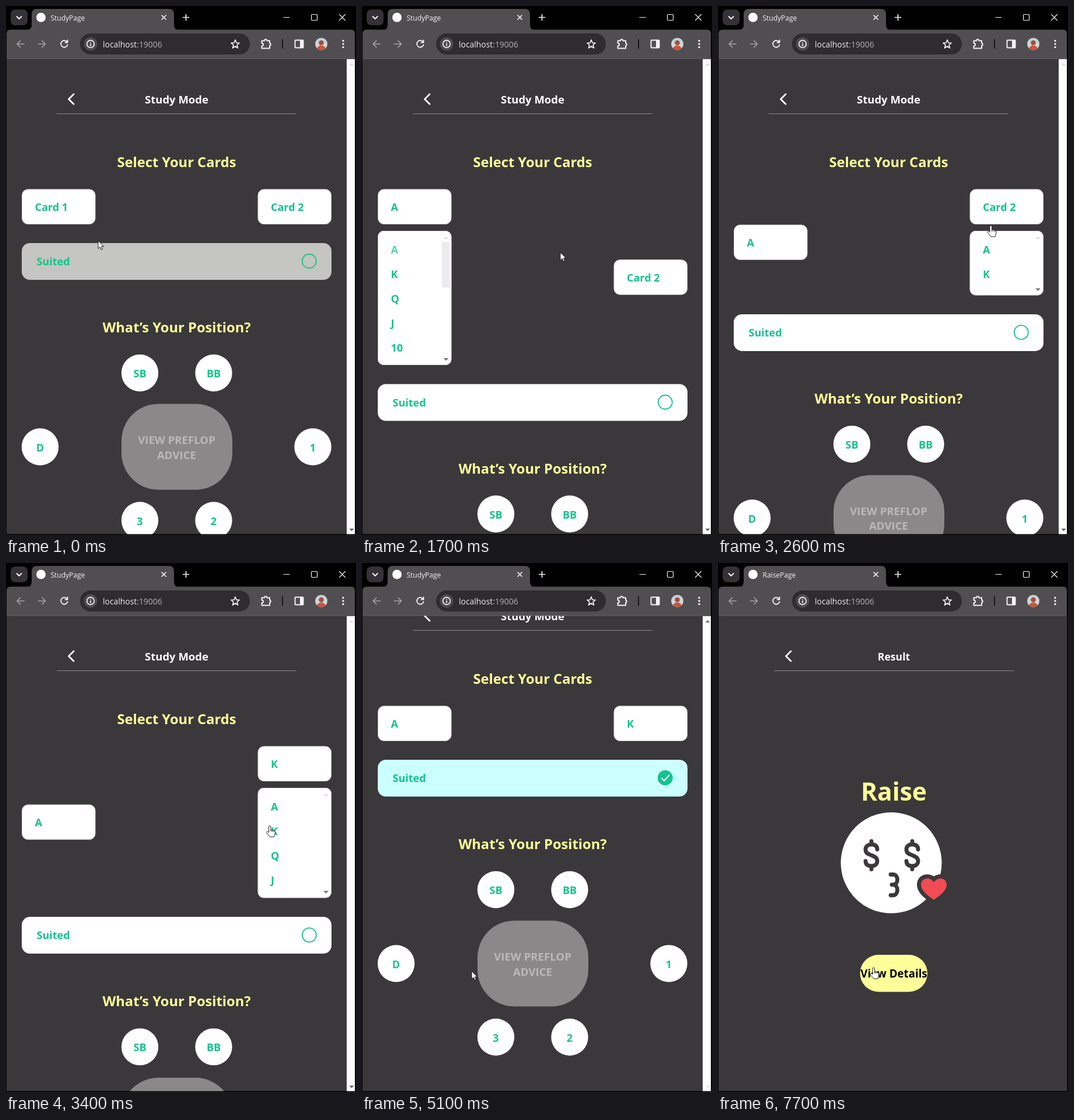
An HTML page for the animation above (8 s loop, 600 by 906 pixels).

```html
<!DOCTYPE html>
<html lang="en">
<head>
<meta charset="utf-8">
<title>StudyPage</title>
<style>
html, body { margin: 0; width: 100%; height: 100%; overflow: hidden; background: #000; }
svg { display: block; width: 600px; height: 906px; }
text { font-family: "Open Sans", "Noto Sans", sans-serif; }
.b { font-weight: 700; }
.mid { text-anchor: middle; }
.g { fill: #14c38e; font-size: 18px; font-weight: 700; }
.h { fill: #ffff99; font-size: 23.7px; font-weight: 700; text-anchor: middle; }
.line { fill: none; stroke-linecap: round; stroke-linejoin: round; }
</style>
</head>
<body>
<svg viewBox="0 0 600 906" xmlns="http://www.w3.org/2000/svg">
  <defs>
    <clipPath id="view"><rect x="1" y="90" width="597" height="814.5"/></clipPath>
    <clipPath id="face"><circle cx="540.5" cy="65" r="10.5"/></clipPath>
    <linearGradient id="sky" x2="0" y2="1">
      <stop offset="0" stop-color="#b9cfdc"/><stop offset="1" stop-color="#e6ddd2"/>
    </linearGradient>
  </defs>
  <rect width="600" height="906" fill="#000"/>
  <rect x="1" y="90" width="597.5" height="814.5" fill="#3b383b"/>

  <g clip-path="url(#view)">
    <g id="study">
      <g id="scroll">
        <path class="line" d="M116 151L107.500 159.500L116 168" stroke="#fff" stroke-width="2.800"/>
        <text class="b mid" x="292.500" y="167" font-size="18.500" fill="#fff">Study Mode</text>
        <path d="M87 184.500H498" stroke="#8b898b"/>
        <text class="h" x="292.500" y="275.500">Select Your Cards</text>
        <g id="cards"></g>
        <g id="lower">
          <rect id="bar" x="27" y="406" width="531" height="63" rx="14"/>
          <text class="g" x="52.500" y="444">Suited</text>
          <circle id="ring" cx="519.800" cy="437" r="12" stroke="#14c38e" stroke-width="1.800"/>
          <path id="tick" class="line" d="M513.500 437.500L518 442L526.500 432.500" stroke="#fff" stroke-width="2.200"/>
          <text class="h" x="292.500" y="559">What’s Your Position?</text>
          <g id="seats"></g>
          <g id="advice" class="b mid" font-size="18.600">
            <rect id="adviceBg" x="198" y="681.500" width="190" height="147" rx="63"/>
            <text x="292.500" y="750">VIEW PREFLOP</text>
            <text x="292.500" y="775.500">ADVICE</text>
          </g>
        </g>
      </g>
      <rect x="584" y="91" width="14" height="814" fill="#fdfdfd"/>
      <path id="up" d="M588.500 102L592.500 97.500L596.500 102Z"/>
      <path id="down" d="M588.500 895L592.500 899.500L596.500 895Z"/>
    </g>

    <g id="result">
      <path class="line" d="M125 151L116.500 159.500L125 168" stroke="#fff" stroke-width="2.800"/>
      <text class="b mid" x="301.500" y="167" font-size="17.600" fill="#fff">Result</text>
      <path d="M96 184.500H507" stroke="#8b898b"/>
      <text class="b mid" x="301.500" y="407" font-size="42.500" fill="#ffff99">Raise</text>
      <circle cx="297" cy="513.500" r="86.500" fill="#fff"/>
      <g class="line" stroke="#3b383b" stroke-width="6.800">
        <path id="eye" transform="translate(263 500.500)" d="M10 -10C10 -16 6 -18.500 0 -18.500C-6 -18.500 -10 -15 -10 -10C-10 -3 -5 -2 0 0C5 2 10 4 10 10C10 15 6 18.500 0 18.500C-6 18.500 -10 16 -10 10M0 -24V-19M0 19V24"/>
        <use href="#eye" x="70"/>
        <path d="M296 533.500H300C310 533.500 310 551 300 551H298M300 551C310 551 310 569 300 569H296"/>
      </g>
      <path d="M370 577C362 571 348 562 348 551C348 539 364 536 370 547C376 536 392 539 392 551C392 562 378 571 370 577Z" fill="#f24b54" stroke="#3b383b" stroke-width="14" stroke-linejoin="round" paint-order="stroke"/>
      <rect x="243.500" y="671" width="115.500" height="63.500" rx="31.700" fill="#ffff99"/>
      <text class="b mid" x="301.500" y="710" font-size="18.700">View Details</text>
    </g>
  </g>

  <g id="chrome">
    <rect x="8" y="6" width="29" height="27" rx="8" fill="#343236"/>
    <path class="line" d="M18.500 18L22.500 22L26.500 18" stroke="#fff" stroke-width="1.800"/>
    <path d="M36 41Q44 41 44 32V14Q44 5 53 5H279Q288 5 288 14V32Q288 41 296 41Z" fill="#504e51"/>
    <path d="M1 90V47Q1 40.500 8 40.500H591Q598 40.500 598 47V90Z" fill="#504e51"/>
    <path d="M1 90H598" stroke="#656366"/>
    <circle cx="60" cy="19.500" r="8" fill="#fff"/>
    <text id="tab" x="76.500" y="24.500" font-size="12" fill="#f2f2f2"></text>
    <g class="line" stroke="#f2f2f2" stroke-width="1.700">
      <path d="M267 16L274 23M274 16L267 23M303.500 19.500H313.500M308.500 14.500V24.500"/>
      <path d="M476 19.500H486M571.500 14.500L581.500 24.500M581.500 14.500L571.500 24.500" stroke-width="1.200"/>
      <rect x="523.500" y="14.500" width="10" height="10" rx="1.500" stroke-width="1.200"/>
      <path d="M31 65H19M24.500 59.500L19 65L24.500 70.500M55.500 65H67.500M62 59.500L67.500 65L62 70.500" stroke="#a5a3a6"/>
      <path d="M105 62A5.800 5.800 0 1 0 105.500 66.500M105.500 58.500V62.500H101.500" stroke-width="1.900"/>
    </g>
    <rect x="127" y="47" width="291" height="36" rx="18" fill="#2e2c2f"/>
    <circle cx="145" cy="65" r="11.500" fill="#4d4b4e"/>
    <g class="line" stroke="#f2f2f2" stroke-width="1.700">
      <circle cx="145" cy="65" r="6.300"/>
      <path d="M145 64.800V68M145 62V62.100"/>
      <path d="M393 58L395 63L400 63.300L396.100 66.700L397.500 72L393 69L388.500 72L389.900 66.700L386 63.300L391 63Z"/>
      <path d="M438.500 59.500H443A2.200 2.200 0 0 1 447.400 59.500H452V63.500A2.300 2.300 0 0 1 452 68V72.500H438.500V68.500A2.400 2.400 0 0 0 438.500 63.500Z" stroke-width="2"/>
      <rect x="495.500" y="58.500" width="14" height="13" rx="1" stroke-width="2"/>
    </g>
    <rect x="504" y="58" width="6" height="14" fill="#f2f2f2"/>
    <text x="166" y="70.500" font-size="13.900" fill="#ececec">localhost<tspan fill="#b3b1b4">:19006</tspan></text>
    <path d="M474 57V73" stroke="#171619" stroke-width="2"/>
    <g clip-path="url(#face)">
      <rect x="529" y="54" width="23" height="23" fill="url(#sky)"/>
      <circle cx="540.500" cy="63" r="4.300" fill="#a0503c"/>
      <ellipse cx="540.500" cy="75" rx="8" ry="7.500" fill="#c8553f"/>
    </g>
    <g fill="#f2f2f2"><circle cx="578" cy="59.500" r="1.700"/><circle cx="578" cy="65" r="1.700"/><circle cx="578" cy="70.500" r="1.700"/></g>
  </g>

  <g id="cursor" stroke="#1d1d1f" stroke-width="1" stroke-linejoin="round" fill="#fff">
    <path id="arrow" d="M0 0V13.500L3.200 10.700L5.300 15.300L7.500 14.300L5.500 9.800H9.600Z"/>
    <g id="hand">
      <path d="M-2 1.800A1.700 1.700 0 0 1 1.500 1.800V6.800L6.500 7.800Q9.200 8.500 9 11.500L8 16.500L7 19H0L-5.500 12.500C-6.800 10.500 -4.500 9 -3 10.500L-2 11.500Z"/>
      <path d="M1.500 7V10M4 7.500V10.300M6.500 8V10.500" fill="none"/>
    </g>
  </g>
</svg>
<script>
const $ = id => document.getElementById(id);
const set = (el, attrs) => { for (const k in attrs) el.setAttribute(k, attrs[k]); };
const show = (el, on) => el.setAttribute('display', on ? 'inline' : 'none');
const shift = (el, x, y) => el.setAttribute('transform', `translate(${x} ${y})`);
const clamp = v => Math.max(0, Math.min(1, v));
const ease = p => (p = clamp(p)) < .5 ? 2 * p * p : 1 - 2 * (1 - p) * (1 - p);
const ramp = (t, from, to) => ease((t - from) / (to - from));
const within = (t, spans) => spans.some(([a, b]) => t >= a && t < b);

const LOOP = 8000, STEP = 100, LAST = 7700;
const LIST_H = 230, GAP = 11.5, SCROLL = 69;
const GREY = '#c5c5c3', MINT = '#ccffff', YELLOW = '#ffff99';

// Dropdown cards
const cards = [
  { x: 27, label: 'Card 1', value: 'A', pick: 1600, open: 752, close: 1700 },
  { x: 431.5, label: 'Card 2', value: 'K', pick: 3200, open: 2355, close: 3250 }
];
$('cards').innerHTML = cards.map((c, i) => `
  <g id="card${i}">
    <rect x="${c.x + .5}" y="314" width="125.500" height="59.500" rx="10" fill="#fff" stroke="#d2d2d2"/>
    <text id="label${i}" class="g" x="${c.x + 22.5}" y="351"></text>
  </g>
  <g id="list${i}">
    <clipPath id="clip${i}"><rect id="mask${i}" x="${c.x}" y="385" width="126.500" rx="10"/></clipPath>
    <g clip-path="url(#clip${i})">
      <rect x="${c.x}" y="385" width="126.500" height="${LIST_H}" fill="#fff"/>
      ${['A', 'K', 'Q', 'J', '10'].map((s, n) =>
        `<text id="opt${i}${n}" class="g" x="${c.x + 22.5}" y="${424 + n * 42.1}">${s}</text>`).join('')}
      <rect id="thumb${i}" x="${c.x + 110}" y="404" width="14" height="78" fill="#ececee"/>
      <path d="M${c.x + 113} 399l4 -4l4 4z" fill="#dcdcdc"/>
      <path id="more${i}" d="M${c.x + 112.5} -2l4.500 4.500l4.500 -4.500z" fill="#777"/>
    </g>
    <rect id="edge${i}" x="${c.x + .5}" y="385.500" width="125.500" rx="10" fill="none" stroke="#d2d2d2"/>
  </g>`).join('');

// Table positions
const seats = [['SB', 229.5, 628.5], ['BB', 356, 628.5], ['D', 58.5, 755],
               ['1', 526, 755], ['3', 229.5, 881], ['2', 356, 881]];
$('seats').innerHTML = seats.map(([s, x, y]) => `
  <g id="seat${s}"><circle cx="${x}" cy="${y}" r="31.700" fill="#fff"/>
  <text class="g mid" x="${x}" y="${y + 7.7}" font-size="18.500">${s}</text></g>`).join('');

// Pointer: time, x, y
const path = [
  [0, 158, 402], [500, 98, 352], [800, 98, 354], [1000, 100, 399], [1300, 72, 412],
  [1500, 72, 412], [1700, 340, 422], [2100, 470, 350], [2400, 470, 352], [2600, 468, 376],
  [2900, 463, 448], [3300, 463, 450], [3900, 273, 450], [4300, 273, 440], [4700, 250, 500],
  [5100, 188, 699], [5600, 228, 805], [6000, 228, 805], [6300, 322, 714],
  [7400, 322, 714], [7700, 267, 693]
];
const handTimes = [[300, 900], [1200, 1600], [2100, 2800], [2900, 4500], [5500, 6000], [6200, LOOP]];

function pointer(t) {
  let i = path.findIndex(k => k[0] > t);
  if (i < 0) return path[path.length - 1].slice(1);
  const [t0, x0, y0] = path[i - 1], [t1, x1, y1] = path[i];
  const p = ramp(t, t0, t1);
  return [x0 + (x1 - x0) * p, y0 + (y1 - y0) * p];
}

// Touch feedback: fade down, then back
const press = (t, at) => 1 - .8 * (ramp(t, at, at + 100) - ramp(t, at + 100, at + 350));

function drawCards(t) {
  const grow = cards.map(c => {
    const h = LIST_H * (ramp(t, c.open, c.open + 500) - ramp(t, c.close, c.close + 500));
    return h > .5 ? h : 0;
  });
  const extra = grow.map(h => h && h + GAP);
  cards.forEach((c, i) => {
    const h = grow[i];
    shift($('card' + i), 0, extra[1 - i] / 2);
    $('label' + i).textContent = t >= c.pick ? c.value : c.label;
    show($('list' + i), h);
    set($('mask' + i), { height: h });
    set($('edge' + i), { height: Math.max(0, h - 1) });
    shift($('more' + i), 0, 375 + h);
    show($('thumb' + i), h > LIST_H - 1);
    const n = c.value === 'A' ? 0 : 1;
    set($('opt' + i + n), { opacity: within(t, [[c.pick - 100, c.pick + 200]]) ? .72 : 1 });
  });
  shift($('lower'), 0, extra[0] + extra[1]);
}

function draw(t) {
  const done = t >= 7000, suited = t >= 4300, seated = t >= 6000;
  show($('study'), !done);
  show($('result'), done);
  $('tab').textContent = done ? 'RaisePage' : 'StudyPage';

  drawCards(t);
  const scrolled = ramp(t, 4700, 5100);
  shift($('scroll'), 0, -SCROLL * scrolled);
  set($('up'), { fill: scrolled > 0 ? '#777' : '#dedede' });
  set($('down'), { fill: scrolled < 1 ? '#666' : '#e8e8e8' });

  set($('bar'), { fill: suited ? MINT : t >= 1600 ? '#fff' : GREY });
  set($('ring'), { fill: suited ? '#14c38e' : 'none' });
  show($('tick'), suited);

  set($('seat3'), { opacity: press(t, 5850) });
  set($('seat3').firstElementChild, { fill: seated ? MINT : '#fff' });
  set($('advice'), { fill: seated ? '#000' : '#bab9ba', opacity: press(t, 6250) });
  set($('adviceBg'), { fill: seated ? YELLOW : '#8a8889' });

  const hand = within(t, handTimes);
  show($('hand'), hand);
  show($('arrow'), !hand);
  shift($('cursor'), ...pointer(t));
}

function tick(now) {
  const t = now % LOOP;
  draw(Math.min(LAST, Math.floor(t / STEP) * STEP));
  requestAnimationFrame(tick);
}
draw(0);
requestAnimationFrame(tick);
</script>
</body>
</html>
```
